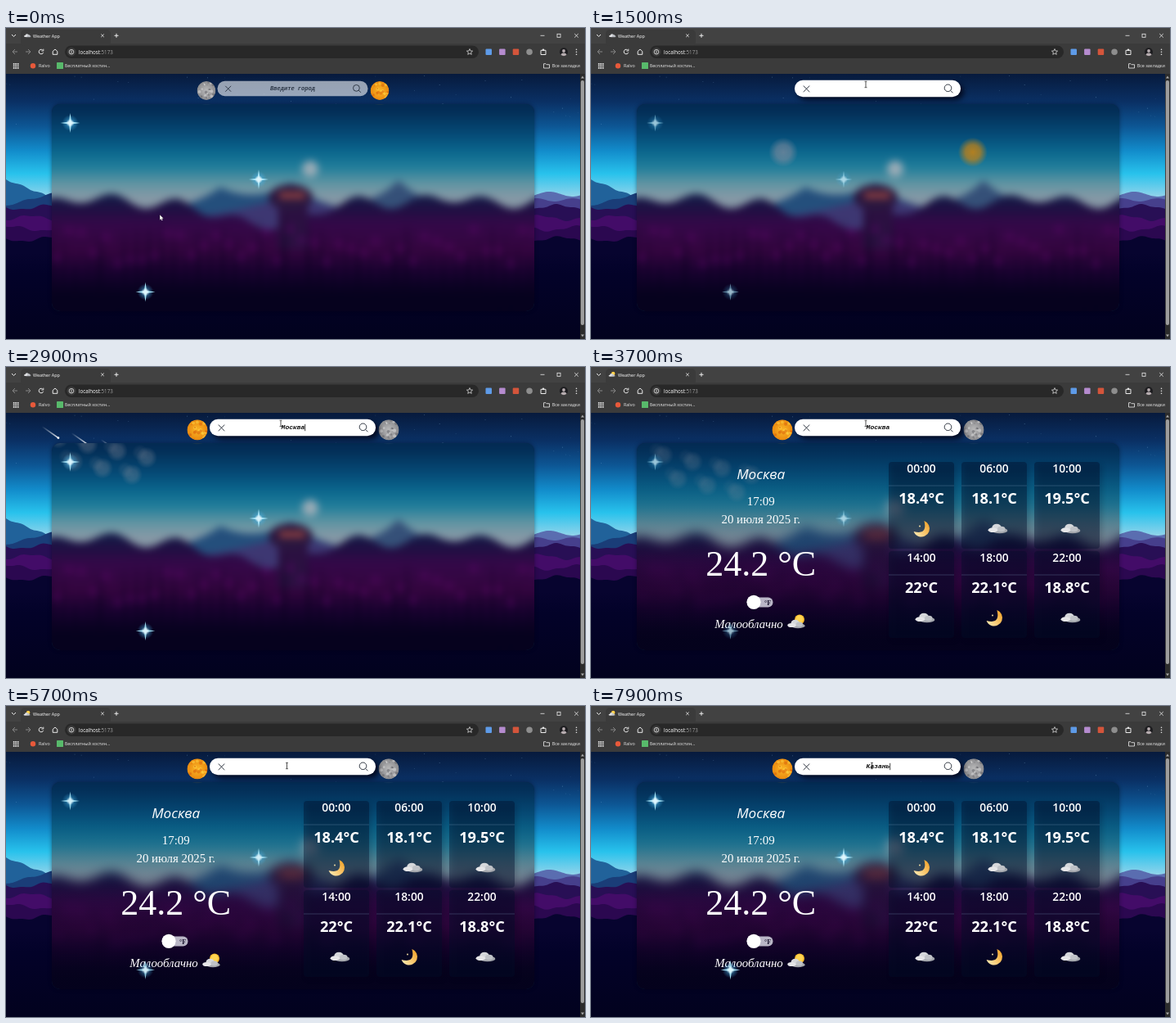
These frames come from a looping animation (708x380 px, 8 s). An HTML page with a canvas:

```html
<!DOCTYPE html>
<html lang="ru">
<head>
<meta charset="utf-8">
<title>Weather App</title>
<style>
html, body { margin: 0; width: 100%; height: 100%; overflow: hidden; background: #03022a; }
canvas { display: block; width: 708px; height: 380px; }
</style>
</head>
<body>
<canvas id="stage"></canvas>
<script>
const W = 708, H = 380, LOOP = 8000, STEP = 100;
const SANS = '"Open Sans", "Noto Sans", sans-serif';
const SERIF = '"Liberation Serif", serif';
const MONO = '"Liberation Mono", monospace';
const { sin, cos, exp, abs, PI } = Math;
const stage = document.getElementById('stage');
const dpr = window.devicePixelRatio || 1;
stage.width = W * dpr;
stage.height = H * dpr;
let c = stage.getContext('2d');

const mix = (a, b, p) => a + (b - a) * p;
const ramp = (t, a, b) => Math.max(0, Math.min(1, (t - a) / (b - a)));
const smooth = p => p * p * (3 - 2 * p);

// Piecewise linear value from [time, value] keys
function track(t, keys) {
  let v = keys[0][1];
  for (let i = 1; i < keys.length; i++) {
    v = mix(v, keys[i][1], ramp(t, keys[i - 1][0], keys[i][0]));
  }
  return v;
}

function random(seed) {
  return () => (seed = (seed * 16807) % 2147483647) / 2147483647;
}

function layer(paint) {
  const el = document.createElement('canvas');
  el.width = W * dpr;
  el.height = H * dpr;
  const old = c;
  c = el.getContext('2d');
  c.scale(dpr, dpr);
  paint();
  c = old;
  return el;
}

function show(image, alpha = 1) {
  c.globalAlpha = alpha;
  c.drawImage(image, 0, 0, W, H);
  c.globalAlpha = 1;
}

function rect(x, y, w, h, r, fill) {
  c.beginPath();
  c.roundRect(x, y, w, h, r);
  c.fillStyle = fill;
  c.fill();
}

function oval(x, y, rx, ry, fill) {
  c.beginPath();
  c.ellipse(x, y, rx, ry, 0, 0, 7);
  c.fillStyle = fill;
  c.fill();
}

const dot = (x, y, r, fill) => oval(x, y, r, r, fill);

function line(points, color, width = 1, close = false) {
  c.beginPath();
  points.forEach(([x, y]) => c.lineTo(x, y));
  if (close) c.closePath();
  c.strokeStyle = color;
  c.lineWidth = width;
  c.stroke();
}

function shape(points, fill) {
  c.beginPath();
  points.forEach(([x, y]) => c.lineTo(x, y));
  c.fillStyle = fill;
  c.fill();
}

function ring(x, y, r, color, width = 1, from = 0, to = 7) {
  c.beginPath();
  c.arc(x, y, r, from, to);
  c.strokeStyle = color;
  c.lineWidth = width;
  c.stroke();
}

function cross(x, y, r, color, width) {
  line([[x - r, y - r], [x + r, y + r]], color, width);
  line([[x + r, y - r], [x - r, y + r]], color, width);
}

function text(s, x, y, font, fill, align = 'left') {
  c.font = font;
  c.fillStyle = fill;
  c.textAlign = align;
  c.fillText(s, x, y);
}

// Star outline with points alternating between two radii
function starPoints(x, y, tips, outer, inner, turn = 0) {
  return Array.from({ length: tips * 2 }, (_, i) => {
    const r = i % 2 ? inner : outer, a = i * PI / tips + turn;
    return [x + r * cos(a), y + r * sin(a)];
  });
}

function vertical(stops) {
  const y0 = stops[0][0], y1 = stops[stops.length - 1][0];
  const g = c.createLinearGradient(0, y0, 0, y1);
  stops.forEach(([y, color]) => g.addColorStop((y - y0) / (y1 - y0), color));
  return g;
}

function glow(x, y, r, rgb, alpha) {
  const g = c.createRadialGradient(x, y, 0, x, y, r);
  g.addColorStop(0, `rgba(${rgb},${alpha})`);
  g.addColorStop(0.5, `rgba(${rgb},${alpha * 0.8})`);
  g.addColorStop(1, `rgba(${rgb},0)`);
  dot(x, y, r, g);
}

// Land below the curve y = f(x)
function ridge(x0, x1, f, fill) {
  const points = [[x0, H + 20]];
  for (let x = x0; x <= x1; x += 2) points.push([x, f(x)]);
  points.push([x1, H + 20]);
  shape(points, fill);
}

const peak = (x, at, width) => exp(-abs(x - at) / width);

function panelPath() {
  c.beginPath();
  c.roundRect(56, 93, 590, 253, 10);
}

function sky() {
  rect(0, 56, 702, 324, 0, vertical([
    [56, '#071a3c'], [90, '#0a3064'], [120, '#0d5694'], [150, '#128ccb'],
    [178, '#28c2ec'], [210, '#a0d6ea'], [380, '#030226']
  ]));
  const rnd = random(77);
  for (let i = 0; i < 60; i++) {
    rect(rnd() * 700, 58 + rnd() * 75, 0.8, 0.8, 0, `rgba(150,200,235,${0.15 + rnd() * 0.4})`);
  }
  ridge(0, 60, x => 185 + x * 0.4 + sin(x / 4), '#21629a');
  ridge(0, 60, x => 217 - x * 0.26 + sin(x / 5), '#1a3d78');
  ridge(640, 702, x => 203 + 3 * sin(x / 9), '#5a6db0');
  ridge(640, 702, x => 210 + 2 * sin(x / 7), '#463f8c');
  ['#280f55', '#430c68', '#2b0850', '#07042f'].forEach((fill, i) => {
    ridge(0, 702, x => 219 + 13 * i + 3 * sin(x / 11 + i * 2) + sin(x / 4), fill);
  });
  rect(0, 275, 702, 105, 0, vertical([[275, '#07042f'], [300, '#030229'], [380, '#02021e']]));
}

const trees = x => 211 + 6 * sin(x / 12) + 4 * sin(x / 23) + 26 * exp(-(((x - 315) / 85) ** 4));

function forest() {
  rect(0, 50, W, 330, 0, vertical([
    [50, '#022044'], [100, '#032c55'], [130, '#054a76'], [150, '#0a658c'],
    [170, '#207d9a'], [190, '#6094a2'], [208, '#8799a6'], [380, '#50466e']
  ]));
  dot(372, 172, 10, '#98abb6');
  ridge(180, 520, x => 230 - 36 * peak(x, 348, 45) - 30 * peak(x, 262, 50), '#244f7c');
  ridge(400, 560, x => 222 - 36 * peak(x, 480, 35), '#355078');
  ridge(200, 480, x => 245 - 42 * peak(x, 350, 110), '#3d3772');
  ridge(20, 680, trees, vertical([
    [200, '#10204a'], [222, '#200f42'], [240, '#340848'], [272, '#34053f'],
    [300, '#1a0231'], [325, '#06021f'], [380, '#02021e']
  ]));
  rect(333, 210, 36, 60, 0, '#2b1041');
  oval(348, 207, 27, 16, '#2a173f');
  rect(334, 200, 32, 9, 3, '#823c40');
  const rnd = random(31);
  for (let x = 40; x < 670; x += 15) {
    const top = 222 + rnd() * 60, half = 5 + rnd() * 6;
    shape([[x, top], [x + half, 350], [x - half, 350]], 'rgba(8,2,30,.5)');
    dot(x + 7, 245 + rnd() * 45, 6, 'rgba(92,8,104,.4)');
  }
}

function glass(source, blur) {
  c.save();
  c.shadowColor = 'rgba(0,0,20,.45)';
  c.shadowBlur = 5 * dpr;
  panelPath();
  c.fillStyle = '#0a2848';
  c.fill();
  c.restore();
  c.save();
  panelPath();
  c.clip();
  c.filter = `blur(${blur * dpr}px)`;
  c.drawImage(source, 0, 0, W, H);
  c.restore();
}

function browser() {
  const ink = '#ececec', dim = '#858585', bar = '#3b3b3b';
  const label = '5.4px ' + SANS;
  rect(0, 0, W, 56, 0, bar);
  rect(0, 0, W, 19, 0, '#424242');
  rect(18, 2, 110, 20, 5, bar);
  line([[7, 8], [9.5, 10.5], [12, 8]], ink);
  text('Weather App', 33, 11.5, label, '#fff');
  cross(118, 9.3, 1.8, ink, 0.8);
  line([[132.5, 9.3], [137.5, 9.3]], ink);
  line([[135, 6.8], [135, 11.8]], ink);
  line([[653.5, 9.3], [658.5, 9.3]], ink, 0.8);
  c.strokeRect(674, 7.3, 4, 4);
  cross(697.5, 9.3, 2.3, ink, 0.8);

  [[11, -1], [27, 1]].forEach(([x, d]) => {
    line([[x - 3 * d, 29], [x + 3 * d, 29]], dim);
    line([[x, 26], [x + 3 * d, 29], [x, 32]], dim);
  });
  ring(43, 29, 2.8, ink, 1, 0.3, 5.4);
  line([[45.8, 25.6], [45.8, 28], [43.4, 28]], ink, 0.9);
  line([[57.2, 28.5], [60, 26], [62.8, 28.5], [62.8, 32.3], [57.2, 32.3]], ink, 1, true);

  rect(72, 21.5, 506, 15.5, 8, '#282828');
  dot(80, 29.2, 5.5, bar);
  ring(80, 29.2, 2.8, ink, 0.8);
  line([[80, 27.6], [80, 30.8]], ink, 0.8);
  text('localhost', 89, 31.5, '6.2px ' + SANS, '#fff');
  text(':5173', 89 + c.measureText('localhost').width, 31.5, c.font, '#a0a0a0');
  line(starPoints(567, 29.3, 5, 3.8, 1.7, -PI / 2), ink, 0.7, true);

  ['#5e9be8', '#b58bcf', '#d4553b', '#8e8e8e'].forEach((fill, i) => {
    rect(586.5 + 16.6 * i, 25.5, 7.5, 7.5, i === 3 ? 4 : 1, fill);
  });
  line([[654, 27.3], [660, 27.3], [660, 32.5], [654, 32.5]], ink, 1, true);
  dot(657, 26.6, 1.2, ink);
  c.save();
  c.beginPath();
  c.arc(682, 29.3, 5, 0, 7);
  c.clip();
  rect(676, 24, 12, 12, 0, '#1d1d20');
  dot(682, 28, 1.9, '#b7adb0');
  oval(682, 34, 3.8, 3.6, '#b7adb0');
  c.restore();

  for (let i = 0; i < 9; i++) {
    rect(8.8 + (i % 3) * 2.5, 43 + Math.floor(i / 3) * 2.5, 1.7, 1.7, 0.3, ink);
    if (i < 3) dot(697.5, 26.3 + 3 * i, 0.8, ink);
  }
  dot(33, 46.2, 3.2, '#e8593a');
  text('Ralvo', 40, 48.2, label, ink);
  rect(62, 42, 8, 8, 0.5, '#58b96b');
  text('Бесплатный хостин...', 72, 48.2, label, ink);
  line([[657.5, 43.7], [660, 43.7], [661, 44.7], [664.5, 44.7], [664.5, 49], [657.5, 49]], ink, 0.8, true);
  text('Все закладки', 702, 48.2, label, ink, 'right');

  rect(702, 56, 6, 324, 0, '#2c2c2c');
  rect(702.8, 64, 4.2, 299, 2, '#9d9d9d');
  [[60, -1.4], [376, 1.4]].forEach(([y, d]) => {
    shape([[703, y - d], [707, y - d], [705, y + d]], '#a8a8a8');
  });
}

function cloud(x, y, s) {
  c.save();
  c.translate(x, y);
  c.scale(s, s);
  oval(3, 2.5, 10, 3.6, '#a3a6ac');
  oval(-1, -1.5, 6, 4.6, '#d6d8db');
  oval(5, 0.5, 5, 3.5, '#bfc2c7');
  oval(-6, 1.8, 6, 3, '#e6e6e8');
  c.restore();
}

function sunCloud(x, y, s) {
  dot(x + 3 * s, y - 3.5 * s, 6 * s, '#fbb92c');
  dot(x + 3 * s, y - 4 * s, 4.5 * s, '#ffd451');
  cloud(x - 1.5 * s, y + 2 * s, 0.85 * s);
}

function crescent(x, y) {
  c.save();
  c.translate(x, y);
  c.beginPath();
  c.arc(0, 0, 10, -1.22, 2.79);
  c.quadraticCurveTo(8, 8, 3.4, -9.4);
  const g = c.createLinearGradient(-8, 8, 9, -6);
  g.addColorStop(0, '#ffe9b0');
  g.addColorStop(1, '#f3a52d');
  c.fillStyle = g;
  c.fill();
  dot(-2, -3, 0.9, '#ffe9a8');
  c.restore();
}

const HOURS = [
  ['00:00', '18.4°C', crescent], ['06:00', '18.1°C', cloud], ['10:00', '19.5°C', cloud],
  ['14:00', '22°C', cloud], ['18:00', '22.1°C', crescent], ['22:00', '18.8°C', cloud]
];

function weather() {
  const put = (s, y, font, x = 207.7) => text(s, x, y, font, '#fff', 'center');
  put('Москва', 136.5, 'italic 17.2px ' + SANS);
  put('17:09', 169, '14.9px ' + SERIF);
  put('20 июля 2025 г.', 191, '14.8px ' + SERIF);
  put('24.2 °C', 255, '44px ' + SERIF);
  rect(191, 281.5, 31.5, 12, 6, '#b9b6c6');
  text('°F', 216, 290.7, 'bold 8px ' + SERIF, '#17122c', 'center');
  dot(199, 287.3, 8.6, '#fff');
  put('Малооблачно', 318.5, 'italic 14.8px ' + SERIF, 193);
  sunCloud(252, 312, 1);

  HOURS.forEach(([hour, temp, icon], i) => {
    const x = 364 + (i % 3) * 89, y = 116 + Math.floor(i / 3) * 109, mid = x + 40;
    c.save();
    c.shadowColor = 'rgba(0,0,20,.45)';
    c.shadowBlur = 6 * dpr;
    c.shadowOffsetX = c.shadowOffsetY = 3 * dpr;
    rect(x, y, 80, 106, 4, 'rgba(2,14,40,.4)');
    c.restore();
    line([[x, y + 29], [x + 80, y + 29]], 'rgba(130,170,195,.35)', 0.8);
    put(hour, y + 13.4, '600 13.8px ' + SANS, mid);
    put(temp, y + 50.6, '700 18.2px ' + SANS, mid);
    icon(mid + (icon === cloud ? 4 : 0), y + 81.5, 0.95);
  });
}

const outdoors = layer(sky);
const woods = layer(forest);
const [clear, hazy] = [5, 7].map(blur => layer(() => {
  show(outdoors);
  glass(woods, blur);
  if (blur < 7) return;
  panelPath();
  c.fillStyle = vertical([[93, 'rgba(0,20,50,0)'], [215, 'rgba(4,4,28,.15)'], [346, 'rgba(2,2,26,.4)']]);
  c.fill();
}));
const frameUi = layer(browser);
const report = layer(weather);

function sparkle(x, y, power) {
  c.save();
  c.globalAlpha = mix(0.5, 1, power);
  glow(x, y, 10, '70,180,235', 0.5);
  shape(starPoints(x, y, 4, mix(10.5, 12, power), 2.2), '#a5e2f5');
  glow(x, y, 5, '235,250,255', 0.9);
  c.restore();
}

// Sharp outside the panel, soft behind it
function eachSide(sharp, soft) {
  c.save();
  c.beginPath();
  c.rect(0, 56, 702, 324);
  c.roundRect(56, 93, 590, 253, 10);
  c.clip('evenodd');
  sharp();
  c.restore();
  c.save();
  panelPath();
  c.clip();
  soft();
  c.restore();
}

function meteors(t) {
  const alpha = track(t, [[1500, 0], [1900, 1], [2900, 0.9], [4700, 0.3], [5500, 0]]);
  if (!alpha) return;
  const drift = 1.8 * (1 - exp((2100 - t) / 1450));
  for (let i = 0; i < 7; i++) {
    const x = 22 + 18 * i + 55 * drift, y = 50 + (i * 29) % 50 + 48 * drift;
    eachSide(() => {
      const g = c.createLinearGradient(x - 20, y - 14, x, y);
      g.addColorStop(0, 'rgba(255,255,255,0)');
      g.addColorStop(1, `rgba(255,255,255,${alpha})`);
      line([[x - 20, y - 14], [x, y]], g, 1.6);
      dot(x, y, 1.4, `rgba(255,255,255,${alpha})`);
    }, () => {
      glow(x, y, 13, '150,150,160', 0.35 * alpha);
      glow(x - 8, y - 6, 10, '150,150,160', 0.15 * alpha);
    });
  }
}

function orb(x, y, r, spin, sun) {
  const [core, rim, light, dark] = sun
    ? ['#fbb526', '#e98a10', '255,215,70', '215,95,10']
    : ['#b9b9ba', '#8b8b8e', '225,225,225', '95,95,100'];
  c.save();
  c.translate(x, y);
  c.rotate(spin);
  c.beginPath();
  c.arc(0, 0, r, 0, 7);
  c.clip();
  const g = c.createRadialGradient(0, 0, 0, 0, 0, r);
  g.addColorStop(0, core);
  g.addColorStop(1, rim);
  dot(0, 0, r, g);
  const rnd = random(sun ? 913 : 457);
  for (let i = 0; i < 26; i++) {
    const a = rnd() * 7, d = Math.sqrt(rnd()) * r;
    dot(d * cos(a), d * sin(a), (0.05 + rnd() * 0.12) * r, `rgba(${i % 2 ? dark : light},.5)`);
  }
  c.restore();
}

function orbs(t, k) {
  const a = PI * track(t, [[750, 0], [900, 0.06], [2100, 0.517], [2800, 1]]);
  const half = k * (117 * cos(a) + 45 * sin(2 * a));
  const y = 74 + k * 2.8 + 121 * sin(a) ** 2;
  [[351 - half, false], [351 + half, true]].forEach(([x, sun]) => {
    eachSide(() => orb(x, y, 12.6 * k, a * 2, sun),
      () => glow(x, y, 18, sun ? '195,130,22' : '150,145,160', sun ? 0.9 : 0.6));
  });
}

function typed(t) {
  const [word, from, gap] = t < 5700 ? ['Москва', 1900, 160] : ['Казань', 6500, 220];
  return word.slice(0, Math.max(0, Math.floor((t - from) / gap) + 1));
}

function search(t, k, open) {
  const ink = '#1c2430';
  c.save();
  c.translate(350.5, 74);
  c.scale(k, k);
  c.save();
  c.shadowColor = `rgba(0,0,15,${0.75 * open})`;
  c.shadowBlur = 6 * dpr;
  c.shadowOffsetX = c.shadowOffsetY = 4 * dpr;
  rect(-101.5, -10.2, 203, 20.4, 10, `rgba(255,255,255,${mix(0.58, 1, open)})`);
  c.restore();
  cross(-87, 0.3, 3.8, ink, 0.9);
  ring(86, -0.7, 4.3, ink, 0.9);
  line([[89.2, 2.4], [92, 5.3]], ink, 0.9);

  const hint = 1 - ramp(t, 600, 1000);
  if (hint) text('Введите город', 0, 2.3, `italic 700 7.8px ${MONO}`, `rgba(25,35,50,${0.85 * hint})`, 'center');
  const word = typed(t);
  text(word, 0.5, 2.4, `italic 700 8px ${MONO}`, '#0a0a0a', 'center');
  const end = 0.8 + c.measureText(word).width / 2;
  if (t >= 700 && (t + 200) % 1000 < 500) line([[end, -4.2], [end, 4.2]], '#111', 0.8);
  c.restore();
}

function pointer(t) {
  const go = smooth(ramp(t, 0, 600)), nudge = smooth(ramp(t, 3700, 4400));
  const x = mix(188, 336, go) + 7.5 * nudge;
  const y = mix(228, 69, go) + 4 * nudge;
  if (y < 84) {
    const tone = y > 64 ? '#222' : '#ddd';
    line([[x, y - 3.5], [x, y + 3.5]], tone, 0.8);
    [-3.7, 3.7].forEach(d => line([[x - 1.5, y + d], [x + 1.5, y + d]], tone, 0.7));
    return;
  }
  line([[x + 1.5, y + 4], [x + 3, y + 7]], '#fff', 1.2);
  const arrow = [[x, y], [x, y + 6.4], [x + 4.5, y + 4.6]];
  shape(arrow, '#fff');
  line(arrow, '#111', 0.4, true);
}

function draw(t) {
  c.setTransform(dpr, 0, 0, dpr, 0, 0);
  const open = smooth(ramp(t, 500, 800));
  const k = mix(0.906, 1, open);
  const loaded = ramp(t, 3200, 3500);
  show(clear);
  show(hazy, loaded);
  meteors(t);
  orbs(t, k);
  show(report, loaded);
  const power = (0.5 + 0.5 * cos(t / LOOP * 6 * PI)) ** 2;
  [[78.5, 116], [309, 185], [170.5, 322.5]].forEach(([x, y]) => sparkle(x, y, power));
  search(t, k, open);
  show(frameUi);
  if (loaded) sunCloud(26, 9.3, 0.38);
  else cloud(26, 9.3, 0.34);
  pointer(t);
}

const start = performance.now();
function tick() {
  const t = (performance.now() - start) % LOOP;
  draw(Math.floor(t / STEP) * STEP);
  requestAnimationFrame(tick);
}
tick();
</script>
</body>
</html>
```
